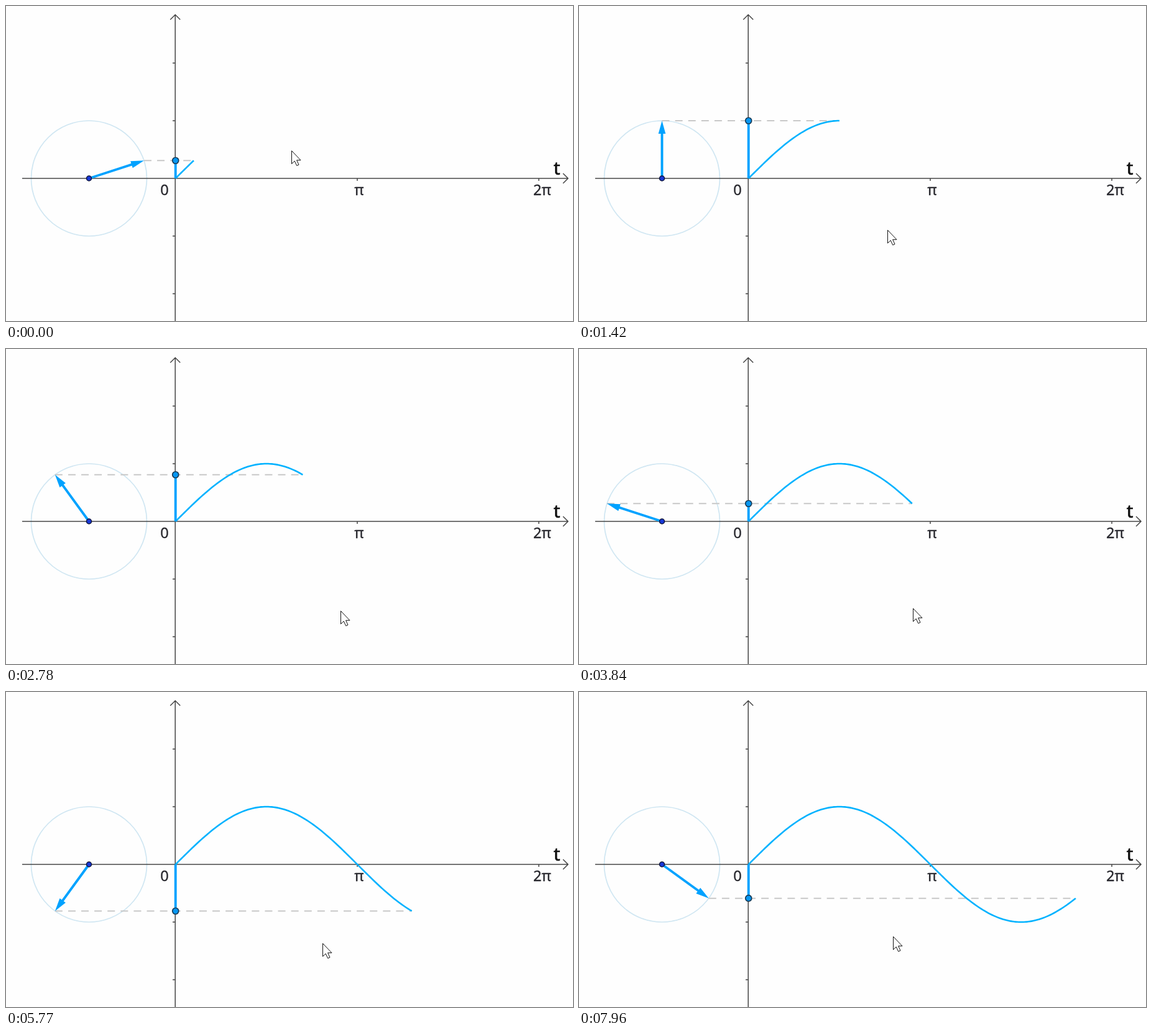
These frames come from a looping animation (912x508 px, 8 s). An HTML page:

```html
<!DOCTYPE html>
<html lang="en">
<head>
<meta charset="utf-8">
<title>Sine from a rotating vector</title>
<style>
html, body { margin: 0; width: 100%; height: 100%; overflow: hidden; background: #fefefe; }
svg { display: block; width: 912px; height: 508px; }
path, line, circle { fill: none; }
text { font: 23.5px "Noto Sans", "Open Sans", sans-serif; fill: #26262c; stroke: #26262c; stroke-width: .35; text-anchor: middle; }
.name { font-size: 29.5px; fill: #111; stroke: #111; stroke-width: .7; }
.axes { stroke: #454545; stroke-width: 1.5; }
.orbit { stroke: #cfe6f2; stroke-width: 1.7; }
.level { stroke: #c8c8c8; stroke-width: 2; stroke-dasharray: 12 9.1; }
.curve { stroke: #00b2ff; stroke-width: 2.6; stroke-linejoin: round; }
.strong { stroke: #00a2ff; stroke-width: 3.9; }
#head { fill: #00a2ff; }
#dot { fill: #0797f2; stroke: #173a55; stroke-width: 1.7; }
.hub { fill: #1838d8; stroke: #10163c; stroke-width: 1.5; }
.cursor { fill: #fff; stroke: #111; }
</style>
</head>
<body>
<svg viewBox="0 0 912 508">
  <circle class="orbit" cx="133.5" cy="278" r="93"/>
  <path class="axes" d="M26 278H904M896 270l8 8-8 8M272.2 508V14M264.2 22l8-8 8 8
    M268 92h4M268 185h4M268 371h4M268 464h4M565 278v4M857 278v4"/>
  <text x="255" y="305">0</text>
  <text x="568" y="305">π</text>
  <text x="862.5" y="305">2π</text>
  <text class="name" x="886" y="272">t</text>
  <line class="level" id="level"/>
  <path class="curve" id="curve"/>
  <line class="strong" id="height" x1="272.7" x2="272.7" y1="278"/>
  <line class="strong" id="shaft" x1="133.5" y1="278"/>
  <path id="head"/>
  <circle class="hub" cx="133.5" cy="278" r="4"/>
  <circle id="dot" cx="272.7" r="5"/>
  <path class="cursor" id="cursor" d="M.5 .5V21.5L5.2 17 8.7 24.5 12 23 8.6 15.7H15Z"/>
</svg>
<script>
const LOOP = 8000, HUB = 133.5, AXIS = 278, ORIGIN = 272.7, R = 93, HALF = 292.3;

// Key points: time, then values
const turn = [[0, 1], [30, 2], [440, 3], [3860, 10], [4785, 12], [7750, 18], [LOOP, 18.5]];
const pointer = [
  [0, 459, 233], [220, 498, 318], [590, 508, 343], [1960, 489, 373], [2530, 504, 408],
  [2880, 552, 428], [3840, 537, 418], [4790, 511, 408], [6800, 506, 402], [LOOP, 505, 394]
];

const $ = id => document.getElementById(id);
const set = (id, attrs) => {
  for (const key in attrs) $(id).setAttribute(key, attrs[key]);
};

function valuesAt(keys, t) {
  const i = keys.findIndex(key => key[0] > t);
  const [t0, ...from] = keys[i - 1], [t1, ...to] = keys[i];
  return from.map((v, j) => v + (to[j] - v) * (t - t0) / (t1 - t0));
}

// Angle in tenths of pi
function drawAngle(step) {
  const a = step * Math.PI / 10, c = Math.cos(a), s = Math.sin(a);
  const at = (along, side = 0) => [HUB + along * c - side * s, AXIS - along * s - side * c];
  const [tipX, tipY] = at(R), [neckX, neckY] = at(R - 16);
  const points = [];
  for (let i = 0; i <= step * 10; i++) {
    points.push([ORIGIN + i * HALF / 100, AXIS - R * Math.sin(i * Math.PI / 100)]);
  }
  set('curve', { d: 'M' + points.join('L') });
  set('level', { x1: tipX, y1: tipY, x2: ORIGIN + step * HALF / 10, y2: tipY });
  set('height', { y2: tipY });
  set('dot', { cy: tipY });
  set('shaft', { x2: neckX, y2: neckY });
  set('head', { d: `M${at(R)}L${at(R - 21, 5.8)}L${at(R - 21, -5.8)}Z` });
}

const start = performance.now();
function frame() {
  const t = (performance.now() - start) % LOOP;
  drawAngle(Math.floor(valuesAt(turn, t)[0]));
  set('cursor', { transform: `translate(${valuesAt(pointer, t).map(Math.round)})` });
  requestAnimationFrame(frame);
}
frame();
</script>
</body>
</html>
```
